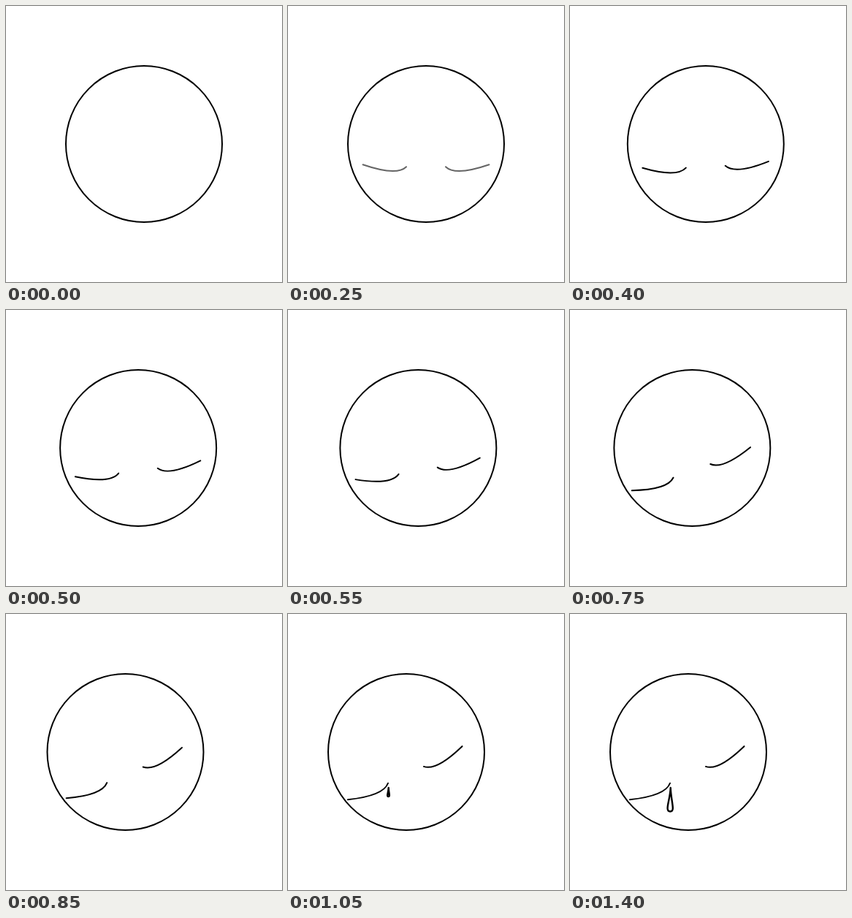
Animation of 378 by 378 pixels, one loop 1.45 s. Source, as an HTML page:

```html
<!DOCTYPE html>
<html lang="en">
<head>
<meta charset="utf-8">
<title>Tear</title>
<style>
  html, body { margin: 0; width: 100%; height: 100%; overflow: hidden; background: #fff; }
  svg { display: block; width: 100%; height: 100%; fill: none; stroke: #000; stroke-width: 2; stroke-linecap: round; stroke-linejoin: round; }
  #drop { stroke-width: 2.4; }
  #drop path { vector-effect: non-scaling-stroke; }
</style>
</head>
<body>
<svg viewBox="0 0 378 378">
  <g id="head">
    <circle cx="189" cy="189" r="107"/>
    <g id="eyes">
      <path d="M102.6 217.3C125 225 151 231 162 220.2"/>
      <path d="M275.4 217.3C253 225 227 231 216 220.2"/>
    </g>
  </g>
  <g id="drop">
    <path d="M0 0C-.4 12-4.1 22-4.1 28C-4.1 34 3.1 34 3.1 28C3.1 22 .5 12 0 0Z"/>
  </g>
</svg>
<script>
  const LOOP = 1450, STEP = 50;
  const [head, eyes, drop] = ['head', 'eyes', 'drop'].map(id => document.getElementById(id));
  const progress = (t, from, to) => Math.min(1, Math.max(0, (t - from) / (to - from)));
  const smooth = u => u * u * (3 - 2 * u);

  function draw(t) {
    const roll = smooth(progress(t, 250, 950));
    head.setAttribute('transform', `translate(${-27 * roll} 0)`);
    eyes.setAttribute('transform', `rotate(${-25 * roll} 189 221.5)`);
    eyes.setAttribute('opacity', progress(t, 25, 400));

    const size = 0.1 + 0.9 * progress(t, 900, 1400);
    drop.setAttribute('transform', `translate(137.7 238) scale(${size})`);
    drop.setAttribute('visibility', t < 900 ? 'hidden' : 'visible');
  }

  const start = performance.now();
  function tick() {
    const t = (performance.now() - start) % LOOP;
    draw(Math.floor(t / STEP) * STEP);
    requestAnimationFrame(tick);
  }
  tick();
</script>
</body>
</html>
```
